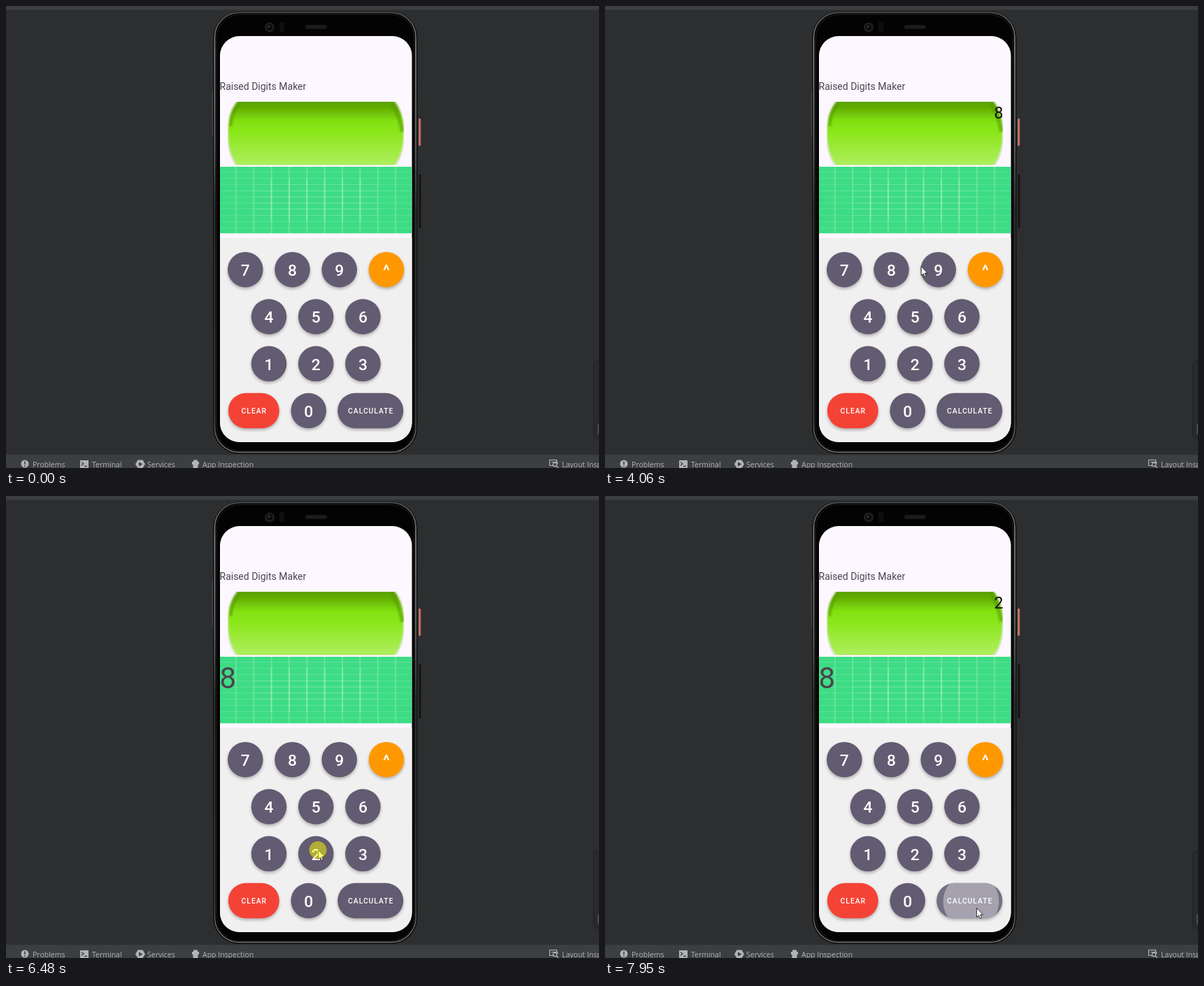
Write an HTML page that moves like this. It is 848 by 661 pixels and loops after 8000 ms.

```html
<!DOCTYPE html>
<html lang="en">
<head>
<meta charset="utf-8">
<title>Keypad demo</title>
<style>
html, body { margin: 0; width: 100%; height: 100%; overflow: hidden; background: #2d2e30; }
svg { display: block; width: 848px; height: 661px; }
text { font-family: Roboto, "Open Sans", sans-serif; }
.bar text { font-family: "Open Sans", "Noto Sans", sans-serif; font-size: 10.5px; fill: #b2b3b5; }
.num { font-size: 22.8px; font-weight: 500; fill: #fff; text-anchor: middle; }
.word { font-size: 10.4px; font-weight: 500; letter-spacing: .94px; fill: #fff; text-anchor: middle; }
</style>
</head>
<body>
<svg viewBox="0 0 848 661" xmlns="http://www.w3.org/2000/svg">
  <defs>
    <linearGradient id="lime" x2="0" y2="1">
      <stop offset="0" stop-color="#5a9d00"/>
      <stop offset=".12" stop-color="#61aa02"/>
      <stop offset=".32" stop-color="#82e010"/>
      <stop offset=".48" stop-color="#8be61a"/>
      <stop offset="1" stop-color="#b1ef63"/>
    </linearGradient>
    <linearGradient id="rim" x2="0" y2="1">
      <stop offset="0" stop-color="#555"/>
      <stop offset=".08" stop-color="#8a8a8a"/>
      <stop offset=".3" stop-color="#777"/>
      <stop offset=".45" stop-color="#3a3a3a"/>
      <stop offset=".92" stop-color="#484848"/>
      <stop offset="1" stop-color="#777"/>
    </linearGradient>
    <filter id="soft" x="-30%" y="-30%" width="160%" height="170%"><feGaussianBlur stdDeviation="2.2"/></filter>
    <filter id="edge"><feGaussianBlur stdDeviation=".9"/></filter>
    <clipPath id="screen"><rect x="306" y="43" width="274.5" height="581" rx="28"/></clipPath>
    <clipPath id="pill"><rect x="317" y="137" width="252.5" height="90.5"/></clipPath>
  </defs>

  <rect width="848" height="661" fill="#2d2e30"/>
  <rect width="848" height="5" fill="#3c3f41"/>
  <rect y="5" width="848" height="1" fill="#333537"/>
  <rect x="840.5" y="508.5" width="20" height="110" rx="4" fill="#282a2b" stroke="#1f2021"/>
  <rect x="846" y="598" width="6" height="15" rx="2" fill="#4b4d4f"/>

  <!-- phone body -->
  <path d="M295.3 122V187" stroke="#4c4c4c"/>
  <path d="M592 241V318" stroke="#151515" stroke-width="3"/>
  <rect x="590" y="161" width="3.2" height="39" rx="1" fill="#c0705d"/>
  <rect x="296.5" y="8.5" width="291.5" height="632" rx="37" fill="#060606" stroke="#171717"/>
  <rect x="298.5" y="9.5" width="287.5" height="629" rx="35" fill="#070707" stroke="url(#rim)" stroke-width="1.6"/>
  <rect x="301.5" y="12.5" width="282" height="624" rx="33" fill="#030303" stroke="#1b1b1b"/>
  <circle cx="377" cy="30.500" r="7" fill="#1c1d1f"/>
  <circle cx="377" cy="30.500" r="4" fill="#0a0b0d"/>
  <circle cx="376" cy="29.500" r="1.500" fill="#3a3d42"/>
  <rect x="391" y="23" width="7" height="14" rx="1" fill="#0e0e0f"/>
  <rect x="428" y="27" width="31" height="6" rx="3" fill="#17181a"/>
  <path d="M430 29.500H457" stroke="#2b2c2e" stroke-dasharray="1 1"/>

  <g clip-path="url(#screen)">
    <rect x="306" y="43" width="275" height="582" fill="#fdf7ff"/>
    <rect x="306" y="332" width="275" height="293" fill="#f0f0f0"/>
    <text x="305.500" y="119.500" font-size="14" fill="#49454f">Raised Digits Maker</text>

    <g clip-path="url(#pill)">
      <path d="M332 133H555Q569 150 569 172V190Q569 214 556 231H330Q317 214 317 190V172Q317 150 332 133Z" fill="#d8e4cb" filter="url(#edge)"/>
      <path d="M334 133H553Q568 152 568 174V188Q567 214 553 231H333Q319 214 318 188V174Q319 150 334 133Z" fill="url(#lime)" filter="url(#edge)"/>
      <path d="M334 140Q323 150 321 172" fill="none" stroke="#559800" stroke-width="5" opacity=".55" filter="url(#edge)"/>
      <path d="M552 140Q563 156 567 180" fill="none" stroke="#559800" stroke-width="6" opacity=".55" filter="url(#edge)"/>
    </g>

    <g id="grid" transform="translate(306 230) scale(2.537 .88)" stroke="#fff" stroke-opacity=".2" stroke-width=".8">
      <rect width="108.200" height="108.200" fill="#3ddc84" stroke="none"/>
    </g>
    <text id="entry" x="569.500" y="161" font-size="23" text-anchor="end" fill="#111"></text>
    <text id="base" x="305.500" y="275" font-size="42" fill="#49454f"></text>
    <g id="keys"></g>
  </g>

  <!-- tool strip -->
  <g class="bar">
    <rect y="642" width="848" height="19" fill="#3c3f41"/>
    <rect y="641.500" width="848" height="1" fill="#323436"/>
    <circle cx="27" cy="655" r="5.500" fill="#b2b3b5"/>
    <path d="M27 651.500V656M27 657.300V659" stroke="#3c3f41" stroke-width="1.600"/>
    <text x="38" y="660">Problems</text>
    <rect x="106" y="650" width="12" height="11" fill="#b2b3b5"/>
    <path d="M108 652.500L111 655L108 657.500M112 658.500H116" fill="none" stroke="#3c3f41" stroke-width="1.300"/>
    <text x="123" y="660">Terminal</text>
    <path d="M188.500 649.500H195.500L199 655.500L195.500 661H188.500L185 655.500Z" fill="#b2b3b5"/>
    <path d="M190 652.500L195.500 655.500L190 658.500Z" fill="#3c3f41"/>
    <text x="202" y="660">Services</text>
    <path d="M268 649.500H274V652H276V656H274.500V661H267.500V656H266V652H268Z" fill="#b2b3b5"/>
    <text x="281" y="660">App Inspection</text>
    <path d="M783 657.500H777.500V649.500H787.500V652M780 652.500H788.500V655" fill="none" stroke="#b2b3b5" stroke-width="1.200"/>
    <circle cx="785" cy="656" r="2.700" fill="none" stroke="#b2b3b5" stroke-width="1.300"/>
    <path d="M787 658L790 661" stroke="#b2b3b5" stroke-width="1.300"/>
    <text x="795" y="660">Layout Inspector</text>
  </g>

  <path id="cursor" d="M.5 .5V13.600L3.400 10.900L5.400 15.500L7.500 14.600L5.500 10.100H9.500Z" fill="#fff" stroke="#111" stroke-width=".8"/>
  <circle id="click" r="12.500" fill="#ff0" opacity=".5"/>
</svg>
<script>
const LOOP = 8000;
const $ = id => document.getElementById(id);

function add(parent, tag, attrs, label) {
  const el = document.createElementNS('http://www.w3.org/2000/svg', tag);
  for (const k in attrs) el.setAttribute(k, attrs[k]);
  if (label) el.textContent = label;
  return parent.appendChild(el);
}

// display grid: full lines, then a second layer over the middle
for (let p = 9; p < 108; p += 10) {
  add($('grid'), 'path', { d: `M${p} 0V108M0 ${p}H108` });
  if (p > 20 && p < 80) add($('grid'), 'path', { d: `M${p} 19V89M19 ${p}H89` });
}

const keys = {};
function addKey(label, cx, cy, fill = '#625b71', w = 50.6) {
  const box = { x: cx - w / 2, y: cy - 25.3, width: w, height: 50.6, rx: 25.3 };
  const id = 'clip' + Object.keys(keys).length;
  const g = add($('keys'), 'g', {});
  add(g, 'rect', { ...box, y: box.y + 2.5, fill: '#000', opacity: .27, filter: 'url(#soft)' });
  add(g, 'rect', { ...box, fill });
  add(add(g, 'clipPath', { id }), 'rect', box);
  const glow = add(g, 'rect', { ...box, fill: '#fff', opacity: 0 });
  const wave = add(g, 'circle', { fill: '#fff', opacity: 0, 'clip-path': `url(#${id})` });
  const word = label.length > 1;
  add(g, 'text', { class: word ? 'word' : 'num', x: cx + (word ? .5 : 0), y: cy + (word ? 4 : 8.8) }, label);
  keys[label] = { glow, wave };
}
['7', '8', '9'].forEach((s, i) => addKey(s, 342.3 + 67.2 * i, 377.2));
addKey('^', 544, 377.2, '#ff9800');
['4', '5', '6'].forEach((s, i) => addKey(s, 376 + 67.2 * i, 444.5));
['1', '2', '3'].forEach((s, i) => addKey(s, 376 + 67.2 * i, 511.8));
addKey('CLEAR', 354.3, 579, '#f44336', 73);
addKey('0', 432.7, 579);
addKey('CALCULATE', 521.2, 579, '#625b71', 94);

// time, x, y, number of hops to the next point
const path = [
  [0, 801, 720, 1],
  [1040, 799, 648, 4],
  [1300, 801, 497, 1],
  [1390, 700, 455, 4],
  [1630, 388, 383, 1],
  [2090, 400, 377, 1],
  [2160, 409, 370, 1],
  [3837, 409, 370, 9],
  [4500, 537, 376, 1],
  [5340, 537, 376, 6],
  [5740, 455, 433, 6],
  [6170, 451, 505, 1],
  [6220, 449, 506, 1],
  [6280, 446, 506, 1],
  [6960, 446, 506, 4],
  [7220, 499, 548, 1],
  [7240, 499, 548, 5],
  [7550, 531, 589, 1],
  [LOOP, 531, 589, 1]
];

// steps: time, wave radius, wave opacity, whole-key opacity
const presses = [
  { key: '8', x: 409, y: 370.5, down: 2420, up: 2570,
    steps: [[2990, 15.5, .25, 0], [3580, 0, 0, .13], [3650, 0, 0, 0]] },
  { key: '^', x: 543, y: 377, down: 4650, up: 4910,
    steps: [[4770, 11, .3, 0], [4840, 19, .32, 0], [4910, 30, .26, 0], [5060, 0, 0, .13], [5210, 0, 0, 0]] },
  { key: '2', x: 445, y: 509, down: 6480, up: 6620,
    steps: [[6620, 14, .25, 0], [6690, 21, .25, 0], [6760, 30, .2, 0], [6890, 0, 0, .13], [6960, 0, 0, 0]] },
  { key: 'CALCULATE', x: 523.5, y: 580, down: 7810, up: 7950,
    steps: [[7880, 20, .3, .08], [7950, 40, .35, .12]] }
];

const last = (list, t, time = e => e[0]) => list.filter(e => time(e) <= t).pop();

function cursorAt(t) {
  const i = path.indexOf(last(path, t));
  const [t0, x0, y0, hops] = path[i];
  const [t1, x1, y1] = path[i + 1];
  const k = Math.floor((t - t0) / (t1 - t0) * hops) / hops;
  return [x0 + (x1 - x0) * k, y0 + (y1 - y0) * k];
}

function set(el, attrs) {
  for (const k in attrs) el.setAttribute(k, attrs[k]);
}

function draw(t) {
  const [x, y] = cursorAt(t);
  $('cursor').setAttribute('transform', `translate(${x} ${y})`);
  const held = presses.some(p => t >= p.down && t < p.up);
  set($('click'), { cx: x, cy: y + .5, opacity: held ? .5 : 0 });
  for (const p of presses) {
    const [, r, wave, glow] = last(p.steps, t) || [0, 0, 0, 0];
    set(keys[p.key].wave, { cx: p.x, cy: p.y, r, opacity: wave });
    set(keys[p.key].glow, { opacity: glow });
  }
  $('entry').textContent = t >= 6760 ? '2' : t >= 3580 && t < 4910 ? '8' : '';
  $('base').textContent = t >= 4910 ? '8' : '';
}

const start = performance.now();
function tick() {
  draw((performance.now() - start) % LOOP);
  requestAnimationFrame(tick);
}
tick();
</script>
</body>
</html>
```
